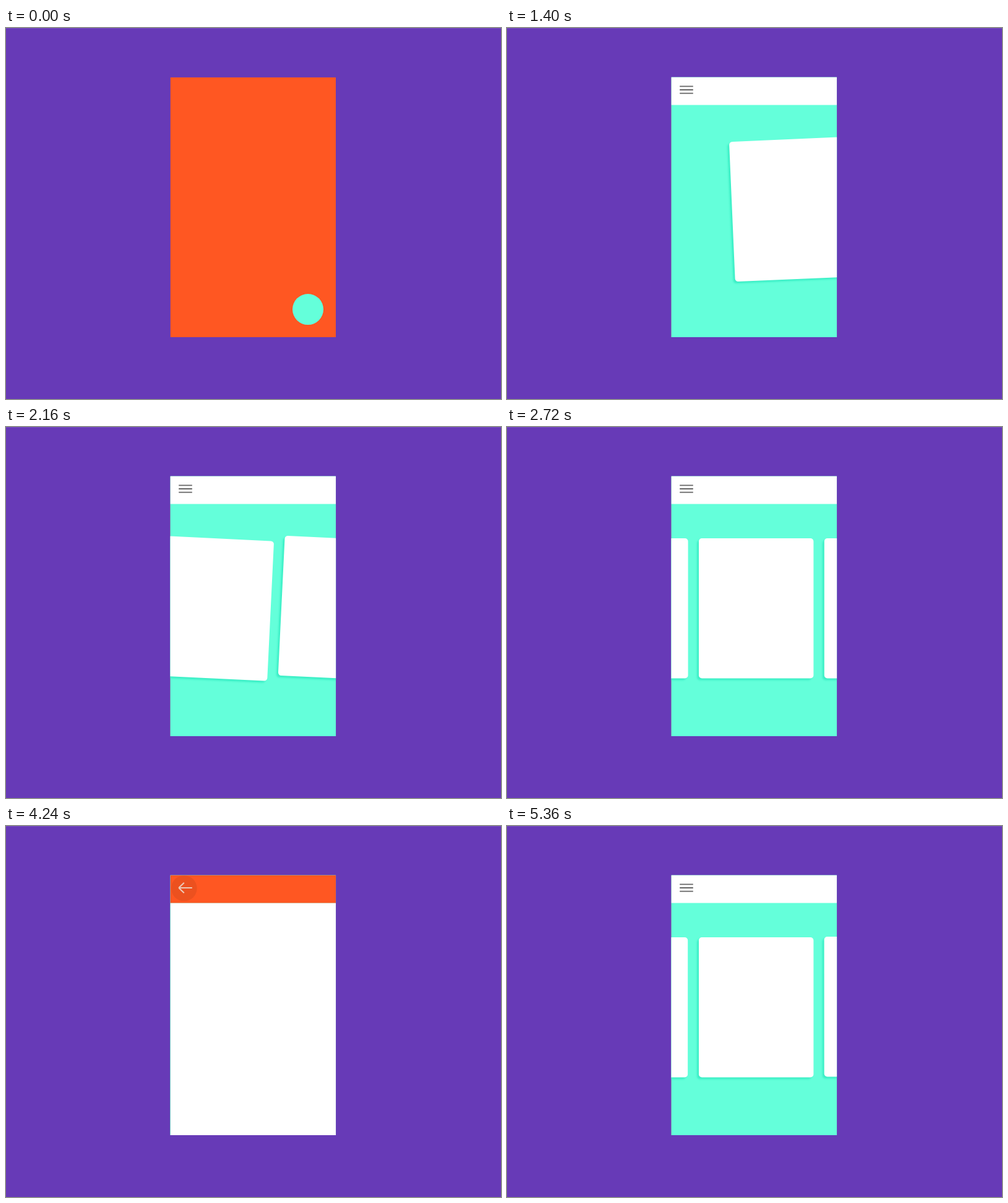
Recreate the animation shown at these times as an HTML page with a canvas. Size 800x600 px, loop 5.64 s.

```html
<!DOCTYPE html>
<html lang="en">
<head>
<meta charset="utf-8">
<title>Card interface</title>
<style>
html, body { margin: 0; width: 100%; height: 100%; overflow: hidden; background: #673ab7; }
canvas { display: block; }
</style>
</head>
<body>
<canvas id="stage" width="800" height="600"></canvas>
<script>
const ctx = document.getElementById('stage').getContext('2d');
const LOOP = 5640, STEP = 40;
const PURPLE = '#673ab7', ORANGE = [255, 87, 34], TEAL = '#64ffda', WHITE = [255, 255, 255];
const phone = { x: 265.5, y: 79.4, w: 267.6, h: 420.7 };
const BAR_BOTTOM = 124.5;
const card = { x: 402.7, y: 293.2, w: 185.4, h: 226.4, gap: 202.8 };

const mix = (a, b, k) => a + (b - a) * k;
const rgb = (a, b, k) => `rgb(${a.map((v, i) => Math.round(mix(v, b[i], k)))})`;
const span = (t, start, end) => Math.min(1, Math.max(0, (t - start) / (end - start)));
const cubic = p => p < .5 ? 4 * p ** 3 : 1 - 4 * (1 - p) ** 3;
const sine = p => .5 - .5 * Math.cos(Math.PI * p);
const ease = (t, start, end) => cubic(span(t, start, end));
const decay = (t, start, tau) => Math.exp(-(t - start) / tau);

function disc(x, y, r, fill) {
  ctx.fillStyle = fill;
  ctx.beginPath();
  ctx.arc(x, y, r, 0, 7);
  ctx.fill();
}

function drawCard(x, y, w, h, degrees, radius) {
  ctx.save();
  ctx.translate(x, y);
  ctx.rotate(degrees * Math.PI / 180);
  ctx.shadowColor = '#3cefc6';
  ctx.shadowOffsetX = -3;
  ctx.shadowOffsetY = 3;
  ctx.shadowBlur = 3;
  ctx.fillStyle = '#fff';
  ctx.beginPath();
  ctx.roundRect(-w / 2, -h / 2, w, h, radius);
  ctx.fill();
  ctx.restore();
}

// Touch mark: grows around the finger, then fades.
function drawTouch(t, start, x, y, radius) {
  if (t < start || t > start + 600) return;
  const alpha = .075 * (1 - span(t, start + 260, start + 600));
  disc(x, y, radius * sine(span(t, start, start + 400)), `rgba(0,0,0,${alpha})`);
}

function drawCards(t) {
  if (t < 1280) return;
  const open = ease(t, 3140, 3600) * (1 - ease(t, 4420, 4880));
  const enter = 150 * decay(t, 1320, 78);
  const swipe = span(t, 1920, 2480);
  const scroll = 215 * cubic(swipe) - 12.2 * sine(span(t, 2500, 2720));
  const tilt = 2.85 * Math.sin(Math.PI * swipe) - .0463 * enter;
  const push = t < 4880 ? 90 * ease(t, 3120, 3400) : 90 * decay(t, 4880, 90);
  const lift = ease(t, 4880, 5200);

  for (const i of [0, 2]) {
    const side = i - 1;
    const x = card.x + enter + i * card.gap - scroll + side * push - (i ? .6 * lift : 0);
    drawCard(x, card.y - (i ? lift : 0), card.w, card.h, tilt - side * .0463 * push, 5);
  }
  const x = card.x + enter + card.gap - scroll;
  const bodyHeight = phone.y + phone.h - BAR_BOTTOM;
  drawCard(
    mix(x, phone.x + phone.w / 2, open),
    mix(card.y, BAR_BOTTOM + bodyHeight / 2, open),
    mix(card.w, phone.w, open),
    mix(card.h, bodyHeight, open),
    tilt, 5 * (1 - open));
}

// Three bars that turn into a back arrow.
function drawIcon(k, alpha) {
  ctx.save();
  ctx.translate(290, 100);
  ctx.rotate(k * Math.PI);
  ctx.globalAlpha = alpha;
  ctx.strokeStyle = rgb([100, 100, 100], [255, 216, 196], k);
  ctx.lineWidth = mix(1.8, 2.1, k);
  ctx.beginPath();
  ctx.moveTo(-10.8, 0);
  ctx.lineTo(10.8, 0);
  for (const s of [-1, 1]) {
    ctx.moveTo(mix(-10.8, 2.2, k), s * mix(5.7, 8.2, k));
    ctx.lineTo(10.8, s * mix(5.7, 0, k));
  }
  ctx.stroke();
  ctx.restore();
}

function drawBar(t) {
  const drop = ease(t, 1080, 1280);
  if (!drop) return;
  const height = BAR_BOTTOM - phone.y;
  const tint = ease(t, 3180, 3520) * (1 - ease(t, 4760, 5060));
  ctx.fillStyle = rgb(WHITE, ORANGE, tint);
  ctx.fillRect(phone.x, phone.y - height * (1 - drop), phone.w, height);
  const arrow = ease(t, 3560, 4040) * (1 - ease(t, 4800, 5280));
  drawIcon(arrow, span(t, 1280, 1380));
}

function draw(t) {
  ctx.fillStyle = PURPLE;
  ctx.fillRect(0, 0, 800, 600);
  ctx.fillStyle = '#7650be';
  ctx.fillRect(0, 0, 800, 1);

  ctx.save();
  ctx.beginPath();
  ctx.rect(phone.x, phone.y, phone.w, phone.h);
  ctx.clip();
  ctx.fillStyle = rgb(ORANGE, ORANGE, 0);
  ctx.fillRect(phone.x, 79.8, phone.w, phone.h);
  const grow = 1 + 17.44 * ease(t, 680, 1160);
  disc(486.2 + 1.8 * grow, 455.5 - .46 * grow, 25 * grow, TEAL);
  drawCards(t);
  drawBar(t);
  ctx.restore();

  drawTouch(t, 90, 486.5, 455, 37);
  drawTouch(t, 2720, 403, 293, 37);
  drawTouch(t, 4020, 287.8, 100.8, 36);
}

function frame() {
  draw(Math.floor(performance.now() % LOOP / STEP) * STEP);
  requestAnimationFrame(frame);
}
draw(0);
requestAnimationFrame(frame);
</script>
</body>
</html>
```
